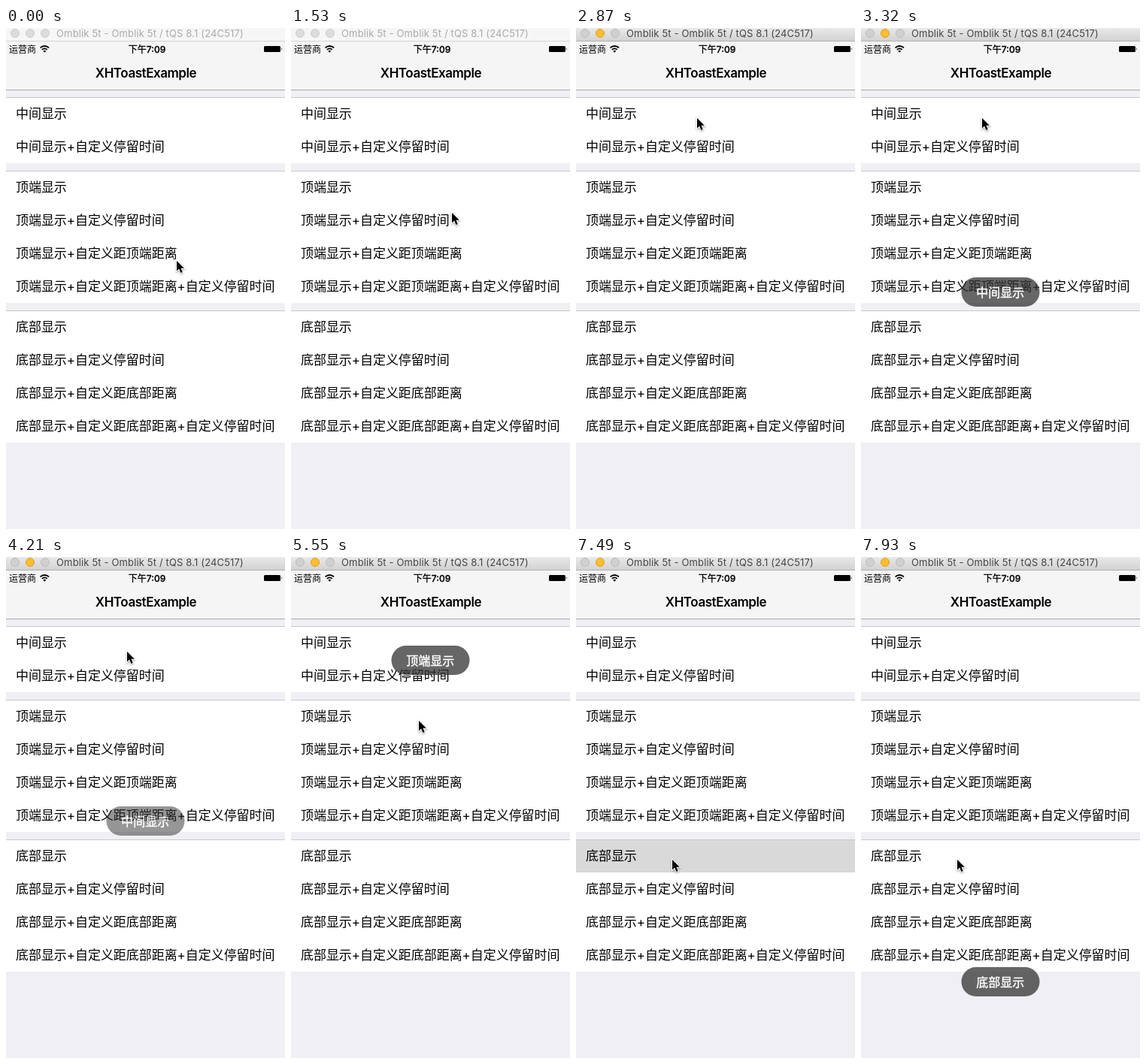
An HTML page for the animation above (8000 ms loop, 371 by 667 pixels).

```html
<!DOCTYPE html>
<html lang="zh-CN">
<head>
<meta charset="utf-8">
<style>
html, body { margin: 0; width: 100%; height: 100%; overflow: hidden; background: #efeff4; }
svg { display: block; width: 371px; height: 667px; font-family: Inter, "Noto Sans CJK SC", "Noto Sans CJK", sans-serif; }
#title { fill: #aaa; font-size: 13px; letter-spacing: .15px; }
#bar { fill: #f6f6f6; }
#edge { fill: #d4d4d4; }
.lamp { fill: #dcdcdc; stroke: #cdcdcd; }
.active #title { fill: #454545; }
.active #bar { fill: url(#chrome); }
.active #edge { fill: #b1b1b1; }
.active .lamp { fill: #d0d0d0; stroke: #bcbcbc; }
.active #yellow { fill: #fdbd2f; stroke: #dfa023; }
#list { font-size: 17px; letter-spacing: -.05px; }
</style>
</head>
<body>
<svg id="stage" viewBox="0 0 371 667">
  <defs>
    <linearGradient id="chrome" x2="0" y2="1">
      <stop stop-color="#e9e9e9"/><stop offset="1" stop-color="#d2d2d2"/>
    </linearGradient>
  </defs>
  <rect width="371" height="667" fill="#efeff4"/>
  <rect y="18" width="371" height="64" fill="#f5f5f6"/>
  <rect y="82" width="371" height="1" fill="#a8a8ab"/>
  <rect id="bar" width="371" height="17"/>
  <rect id="edge" y="17" width="371" height="1"/>
  <circle class="lamp" cx="12" cy="7" r="5.5"/>
  <circle class="lamp" id="yellow" cx="32" cy="7" r="5.5"/>
  <circle class="lamp" cx="52" cy="7" r="5.5"/>
  <text id="title" x="67" y="12">Omblik 5t - Omblik 5t / tQS 8.1 (24C517)</text>

  <text x="4" y="32.5" font-size="12">运营商</text>
  <g fill="none" stroke="#000" stroke-width="1.8">
    <path d="M45.6 26.4a8 8 0 0 1 11.4 0M47.9 28.8a4.8 4.8 0 0 1 6.8 0"/>
    <path d="M51.3 32.8l-1.9-2a2.7 2.7 0 0 1 3.8 0z" fill="#000" stroke="none"/>
  </g>
  <text x="187.5" y="32.5" font-size="12" font-weight="500" stroke="#000" stroke-width=".3" text-anchor="middle">下午7:09</text>
  <rect x="343" y="24" width="22" height="8" rx="1.5"/>
  <path d="M366 26.2q1.6 1.8 0 3.6z"/>
  <text x="186" y="66" font-size="17" font-weight="600" letter-spacing="-.45" text-anchor="middle">XHToastExample</text>

  <g id="list"></g>
  <g id="toast">
    <rect x="133.5" width="104" height="39" rx="19.5" fill="#333" fill-opacity=".75"/>
    <text id="label" x="185.3" y="25.5" fill="#fff" stroke="#fff" stroke-width=".4" font-size="16" text-anchor="middle"></text>
  </g>
  <path id="cursor" d="M0 0V13.5l3.1-2.9 2.3 5.3 2.3-1-2.2-5.1h4.3z"
        stroke="#fff" stroke-width="2" paint-order="stroke" style="filter:drop-shadow(0 1px 1px #0006)"/>
</svg>
<script>
const $ = id => document.getElementById(id);
const LOOP = 8000;

// Each section: top edge, place, distance wording (if any)
const sections = [[92, '中间'], [190, '顶端', '距顶端距离'], [376, '底部', '距底部距离']];
let rows = '';
for (const [top, place, gap] of sections) {
  const show = place + '显示', stay = '自定义停留时间';
  const items = [show, `${show}+${stay}`];
  if (gap) items.push(`${show}+自定义${gap}`, `${show}+自定义${gap}+${stay}`);
  rows += `<rect y="${top}" width="371" height="${items.length * 44}" fill="#fff"/>`;
  if (place === '底部') rows += `<rect id="pressed" y="${top}" width="371" height="44" fill="#d9d9d9"/>`;
  rows += `<rect y="${top}" width="371" height="1" fill="#c8c7cc"/>`;
  items.forEach((text, i) => rows += `<text x="13" y="${top + 28 + i * 44}">${text}</text>`);
}
$('list').innerHTML = rows;

// The screen is only refreshed at these moments
const ticks = [0, 1350, 1500, 1650, 1830, 1980, 2270, 2420, 2570, 2720, 2870, 3020, 3170, 3320,
  3920, 4060, 4210, 4360, 4510, 5250, 5400, 5550, 6450, 6600, 6740, 6890, 7490, 7640, 7790, 7930];

// Cursor stops: time, x, y
const path = [[0, 227, 310], [1200, 227, 310], [1980, 187, 115], [2130, 187, 115], [2720, 161, 120],
  [3770, 161, 120], [4210, 161, 126], [4510, 170, 218], [6300, 170, 218], [6890, 128, 403], [LOOP, 128, 403]];

// Toasts: fade-in start, fade-out start, top edge, text
const toasts = [[2990, 4150, 332, '中间显示'], [5220, 6390, 118, '顶端显示'], [7610, 9000, 546, '底部显示']];

const progress = (t, from, length) => Math.min(1, Math.max(0, (t - from) / length));
const smooth = p => p * p * (3 - 2 * p);

function cursorAt(t) {
  const i = path.findIndex(stop => stop[0] > t);
  const [t0, x0, y0] = path[i - 1], [t1, x1, y1] = path[i];
  const p = smooth(progress(t, t0, t1 - t0));
  return [x0 + (x1 - x0) * p, y0 + (y1 - y0) * p].map(Math.round);
}

function draw(now) {
  const time = now % LOOP;
  const t = ticks.findLast(tick => tick <= time);
  $('stage').classList.toggle('active', t >= 2870);
  $('pressed').style.display = t === 7490 ? '' : 'none';
  $('cursor').setAttribute('transform', `translate(${cursorAt(t)})`);

  const [start, end, top, text] = toasts.findLast(toast => toast[0] <= t) || toasts[0];
  const alpha = progress(t, start, 300) ** 1.7 * (1 - progress(t, end, 300)) ** 1.7;
  $('toast').setAttribute('opacity', alpha);
  $('toast').setAttribute('transform', `translate(0 ${top})`);
  $('label').textContent = text;
}

const began = performance.now();
function loop() {
  draw(performance.now() - began);
  requestAnimationFrame(loop);
}
loop();
</script>
</body>
</html>
```
